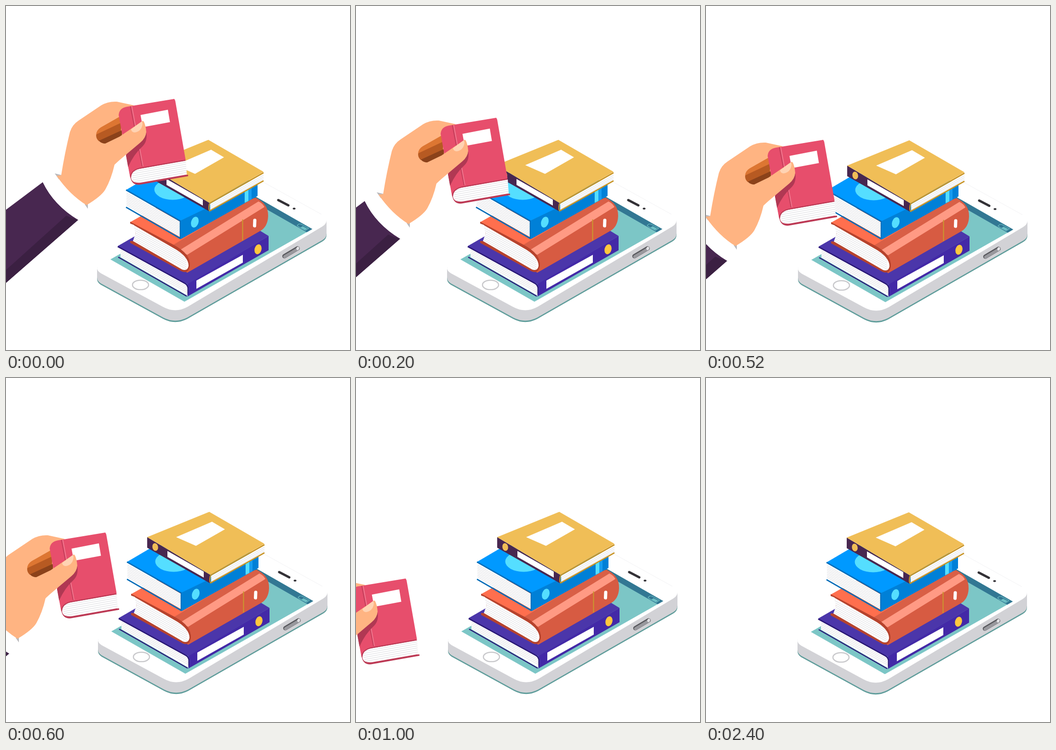
These frames come from a looping animation (748 by 748 pixels, 3.2 s). An HTML page with a canvas:

```html
<!DOCTYPE html>
<html lang="en">
<head>
<meta charset="utf-8">
<title>Books on a phone</title>
<style>
html, body { margin: 0; width: 100%; height: 100%; overflow: hidden; background: #fff; }
canvas { display: block; width: 748px; height: 748px; }
</style>
</head>
<body>
<canvas id="stage" width="748" height="748"></canvas>
<script>
const ctx = document.getElementById('stage').getContext('2d');
const STEP = 200, LOOP = 3200;

// Each pose: hand x, y, then the small sway of the phone and its stack.
const poses = [
  [0, 0, 0, 0], [-61, 41, 0, 0], [-111, 89, 2, 1], [-150, 134, 2, 0],
  [-219, 186, 0, 1], [-258, 234, 2, 0], [null, 0, 1, 1]
];

function fill(color, d) {
  ctx.fillStyle = color;
  ctx.fill(new Path2D(d));
}

function line(color, width, d, cap = 'butt') {
  ctx.strokeStyle = color;
  ctx.lineWidth = width;
  ctx.lineCap = cap;
  ctx.lineJoin = 'round';
  ctx.stroke(new Path2D(d));
}

function oval(color, x, y, rx, ry, tilt = 0) {
  ctx.fillStyle = color;
  ctx.beginPath();
  ctx.ellipse(x, y, rx, ry, tilt, 0, Math.PI * 2);
  ctx.fill();
}

// White page block with thin sheets running along its long side.
function pages(shape, x1, y1, x2, y2, depth, sheets, lean = 0) {
  const path = new Path2D(shape);
  ctx.save();
  ctx.fillStyle = '#fff';
  ctx.fill(path);
  ctx.clip(path);
  for (let i = 1; i < sheets; i++) {
    const k = i / sheets;
    const dx = lean * k, dy = depth * k;
    line('#dadade', 1, `M${x1 + dx} ${y1 + dy}L${x2 + dx} ${y2 + dy}`);
  }
  ctx.restore();
}

function phone() {
  const rim = 'M198 568V590Q198 598 206 603L342 677.5Q368 691 394 677.5L688 509Q697 504 697 494V465Z';
  ctx.save();
  ctx.translate(0, 3);
  fill('#5f9d9b', rim);
  ctx.restore();
  fill('#d2d2d6', rim);
  fill('#fff', 'M198 570Q198 562 207 557L505 383Q530 368 556 381L686 453Q697 459 697 466' +
    'Q697 474 687 480L395 654Q368 669 341 654L206 581Q198 576 198 570Z');
  line('#f2f2f4', 1, 'M556 381L686 453');
  fill('#7cc6c6', 'M227 551L505 393L666 485L388 643Z');
  fill('#327793', 'M505 393L666 485L654 492L493 400Z');
  line('#6dbfc4', 1.2, 'M633 477L637 474L641 474L658 483L651 488L636 480Z');
  fill('#6dbfc4', 'M645 479L655 484L650 487L640 482Z');
  line('#333136', 5, 'M592 422L614 433.5', 'round');
  oval('#333136', 626.5, 440.5, 3, 2.1);
  ctx.strokeStyle = '#c9c9cc';
  ctx.lineWidth = 2.6;
  ctx.beginPath();
  ctx.ellipse(292.5, 606.5, 17.5, 10.3, 0, 0, Math.PI * 2);
  ctx.stroke();
  line('#59595e', 9.5, 'M605.5 544L634 527', 'round');
  line('#98989d', 6.5, 'M606 545L634 528.5', 'round');
  oval('#e2e2e5', 634.5, 527, 3, 3.8, 0.4);
}

function purpleBook() {
  fill('#4b36aa', 'M243 522L420 420L553 489L571 500L395 605Z');
  pages('M249 526L388 602Q398 607 397 618L395 630L249 546Z', 249, 527, 396, 608, 20, 5);
  line('#2b1877', 2.4, 'M244 546L393 631');
  line('#2b1877', 3, 'M243 523L388 602.5Q397 607 396 617V629');
  fill('#4329a7', 'M394 605L571 500V531L394 632Q399 622 397 611Z');
  fill('#fff', 'M414 597L515 541V558L414 615Z');
  oval('#ffc83e', 548, 529, 7.5, 11, 0.25);
}

function orangeBook() {
  fill('#d75b42', 'M366 526L543 417Q571 430 570 457Q569 480 553 489L394 580L380 570Z');
  fill('#ff6f4e', 'M270 470L440 374L535 418L364 522Z');
  fill('#d95f46', 'M361 521L530 420L543 417L552 424L378 532Z');
  fill('#ff9a84', 'M376 532L549 425Q558 429 562 437L394 541Z');
  fill('#b6432d', 'M270 469L364 519Q402 539 400 565Q397 583 382 577L270 515V511L277 511' +
    'Q286 494 278 476L270 473Z');
  pages('M277 476L362 525Q397 544 397 565Q395 577 383 573L276 511L282 494Z',
    276, 477, 392, 541, 35, 8);
  line('#cb9730', 2.2, 'M514.5 464V510');
  line('#fff', 7, 'M541 466L540.5 478', 'round');
}

function blueBook() {
  const top = 'M261 400L312 370L430 330L547 388L380 467Z';
  fill('#0099ff', top);
  ctx.save();
  ctx.clip(new Path2D(top));
  oval('#55deff', 362.5, 399, 40, 22.5);
  ctx.restore();
  fill('#0080d7', 'M379 467L547 386V413L380 507Z');
  fill('#55deff', 'M519 400L527 396V424L519 428Z');
  fill('#169cf0', 'M527 396L534 392V420L527 424Z');
  pages('M262 403L378 469V502L262 436Z', 262, 403, 378, 469, 33, 9);
  line('#006cb8', 2.6, 'M261 400L379 467.5V505.5L261 437.5');
  line('#0080d7', 1.5, 'M380.5 467V506');
  oval('#55deff', 410.5, 470, 8, 12, 0.3);
}

function yellowBook() {
  fill('#482750', 'M305 346L442 428L441 446L305 369Z');
  fill('#fff', 'M349 376L428 421V434L349 389Z');
  oval('#f0bd57', 322.5, 367.5, 6.2, 8.4, -0.2);
  pages('M444 430L560 364V380L444 445Z', 444, 430, 560, 364, 16, 4);
  line('#c79326', 2.6, 'M560 380L443 445.5Q440 443 442 432Q443 428 448 426L560 362.5');
  fill('#f0be57', 'M305 346L440 291L560 360.5L442 428Z');
  fill('#fff', 'M368 346L446 312.5L474 329L411 365Z');
}

function sleeve() {
  fill('#482750', 'M0 443L80 383Q103 432 157 465L0 602Z');
  fill('#3b2042', 'M0 574L131 456Q144 462 157 465L0 602Z');
  fill('#fff', 'M80 383L108 362L178 437L157 465Q106 435 80 383Z');
  fill('#b9b9bd', 'M106 364L122 368L115 377Z');
  fill('#b9b9bd', 'M171 431L178 431L178 441Z');
}

function palm() {
  fill('#ffb482', 'M120 368Q128 318 139 274Q144 258 158 249L207 216Q222 207 241 208L278 216' +
    'L262 225L262 320L236 345Q229 376 216 399Q207 414 175 433Q138 410 110 369Z');
  fill('#dd7632', 'M250 239L206 264Q196 270 196 281L250 257Z');
  fill('#b75a22', 'M196 281Q196 289 202 294L250 275V254L197 279Z');
  fill('#8b421a', 'M202 293Q208 300 218 299L252 285V270Z');
}

function pinkBook() {
  fill('#bd3a55', 'M245 238L271 375Q275 390 291 388.5L396 370V367L391 367L389 332L260 318Z');
  fill('#e74e6c', 'M245 237Q246 222 263 219L366 202L368 206L390.5 334L290 352Q269 358 270 373Z');
  line('#c43f5b', 2, 'M270.5 218L296 349');
  line('#f07a91', 1.8, 'M273.5 218L298 348.5');
  pages('M391 336L393 366.5L293 384Q273 386 272 373Q273 357 290 354Z',
    274, 356, 392, 335, 31, 7, 2);
  line('#bd3a55', 2, 'M390.5 335.5L290 353Q271 358 271 373');
  fill('#fff', 'M292.5 237L352 225.5L356.5 252.5L297.5 263.5Z');
  fill('#b03853', 'M261 325L265.5 350Q278 322 298 304Q308 293 305 274L275 300Z');
}

function thumb() {
  fill('#ffb482', 'M214 300L247 284L294 252Q298 248 300 252Q304 260 305 274' +
    'Q304 287 292 297L235 345L205 350Z');
  fill('#ffd3b3', 'M272 268L295 251Q299 256 294 266Q289 274 280 275Q273 275 272 268Z');
}

function scene(now) {
  const t = now % LOOP;
  const [hx, hy, sx, sy] = poses[Math.min(poses.length - 1, Math.floor(t / STEP))];
  ctx.fillStyle = '#fff';
  ctx.fillRect(0, 0, 748, 748);

  ctx.save();
  ctx.translate(sx, sy);
  [phone, purpleBook, orangeBook, blueBook, yellowBook].forEach(draw => draw());
  ctx.restore();

  if (hx !== null) {
    ctx.save();
    ctx.translate(hx, hy);
    [sleeve, palm, pinkBook, thumb].forEach(draw => draw());
    ctx.restore();
  }
}

let start = null;
function tick(now) {
  if (start === null) start = now;
  scene(now - start);
  requestAnimationFrame(tick);
}
scene(0);
requestAnimationFrame(tick);
</script>
</body>
</html>
```
